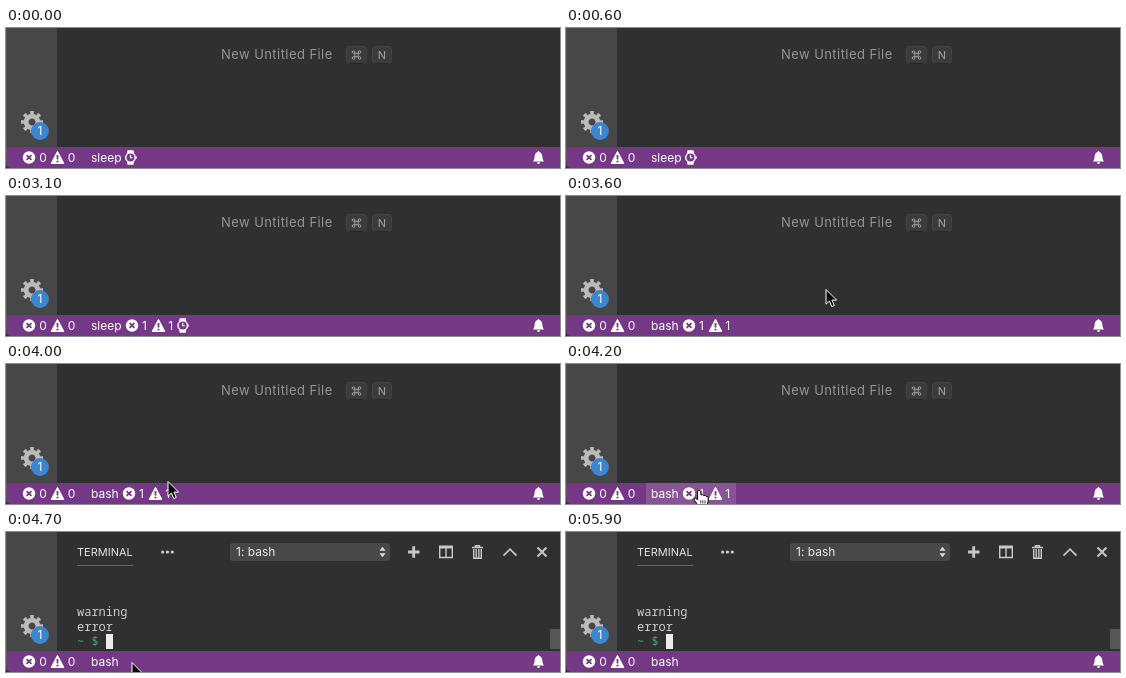
Animation of 554 by 140 pixels, one loop 6.3 s. Source, as an HTML page:

```html
<!DOCTYPE html>
<html lang="en">
<head>
<meta charset="utf-8">
<title>Terminal status</title>
<style>
  html, body { margin: 0; width: 100%; height: 100%; overflow: hidden; background: #303030; }
  svg { display: block; }
  text { font: 12px Inter, "Open Sans", sans-serif; white-space: pre; }
  .mono text { font: 12px "Noto Sans Mono", "DejaVu Sans Mono", monospace; fill: #ccc; }
  .status { fill: #fff; }
  .line { fill: none; stroke: #c8c8c8; }
  [data-show], #arrow, #hand { display: none; }
</style>
</head>
<body>
<svg width="554" height="140" viewBox="0 0 554 140">
  <defs>
    <g id="err">
      <circle r="6.2" fill="#fff"/>
      <path d="M-2.4-2.4 2.4 2.4M2.4-2.4-2.4 2.4" stroke="#743886" stroke-width="1.8"/>
    </g>
    <g id="warn">
      <path d="M0-5.8 6 5.7H-6Z" fill="#fff" stroke="#fff" stroke-width="1.4" stroke-linejoin="round"/>
      <path d="M0-2.6V2M0 3.3V5" stroke="#743886" stroke-width="1.8"/>
    </g>
    <g id="watch">
      <path d="M-3-7.3H3L3.6-4H-3.6ZM-3 7.3H3L3.6 4H-3.6ZM4.8-1H6.3V1H4.8Z" fill="#fff"/>
      <circle r="4.7" fill="#743886" stroke="#fff" stroke-width="1.4"/>
      <path d="M0-2.7V.3H2.2" fill="none" stroke="#fff" stroke-width="1.1"/>
    </g>
  </defs>

  <!-- window -->
  <rect width="554" height="140" fill="#303030"/>
  <rect width="51" height="119" fill="#474747"/>

  <!-- gear and badge -->
  <g transform="translate(26 94)" fill="none" stroke="#bcbcb9">
    <circle r="5.9" stroke-width="4.8"/>
    <circle r="9.3" stroke-width="3.4" pathLength="16" stroke-dasharray="1" stroke-dashoffset=".5"/>
  </g>
  <circle cx="34" cy="103" r="9" fill="#3b86d1"/>
  <text x="34" y="107.3" fill="#fff" text-anchor="middle">1</text>

  <!-- empty editor -->
  <g data-show="0 4700">
    <text x="215" y="31" fill="#959595" style="font-size:13px;letter-spacing:.43px">New Untitled File</text>
    <g fill="#3b3b3b" stroke="#444">
      <rect x="340.5" y="18.5" width="20" height="17" rx="3"/>
      <rect x="366.5" y="18.5" width="19" height="17" rx="3"/>
    </g>
    <path d="M343 35.5H358M369 35.5H383" stroke="#292929"/>
    <path transform="translate(350.5 27)" fill="none" stroke="#a2a2a2"
      d="M-1.7-1.7H1.7V1.7H-1.7ZM-1.7-1.7H-3A1.3 1.3 0 1 1-1.7-3ZM1.7-1.7V-3A1.3 1.3 0 1 1 3-1.7ZM1.7 1.7H3A1.3 1.3 0 1 1 1.7 3ZM-1.7 1.7V3A1.3 1.3 0 1 1-3 1.7Z"/>
    <text x="376" y="31" fill="#a2a2a2" text-anchor="middle" style="font-size:11px">N</text>
  </g>

  <!-- terminal panel -->
  <g data-show="4700 6300">
    <text x="71" y="24" fill="#e4e4e4" style="font-size:11px">TERMINAL</text>
    <path d="M71 33.5H127" stroke="#696969"/>
    <g fill="#d0d0d0">
      <circle cx="156.7" cy="20" r="1.6"/><circle cx="161.5" cy="20" r="1.6"/><circle cx="166.3" cy="20" r="1.6"/>
    </g>
    <rect x="224" y="11" width="160" height="18" rx="3" fill="#484848"/>
    <text x="230" y="24.3" fill="#ececec">1: bash</text>
    <path d="M373.5 18.7 376.5 14.7 379.5 18.7ZM373.5 21.3 376.5 25.3 379.5 21.3Z" fill="#ddd"/>
    <g class="line">
      <path d="M402 20H413.5M407.7 14.2V25.8" stroke-width="2.8"/>
      <path d="M433.7 15V25.5H446.3V15M440 15V25.5" stroke-width="1.4"/>
      <path d="M433 15H447" stroke-width="3"/>
      <path d="M466 15.5H477M469.5 15V13.7H473.5V15" stroke-width="1.4"/>
      <path d="M467.7 17V26.2H475.3V17M470.2 17V26M472.8 17V26" stroke-width="1.4"/>
      <path d="M497.5 23.7 504 17.2 510.5 23.7" stroke-width="1.7"/>
      <path d="M531.5 15.5 540.5 24.5M540.5 15.5 531.5 24.5" stroke-width="2"/>
    </g>
    <g class="mono">
      <text x="71" y="84">warning</text>
      <text x="71" y="99">error</text>
      <text x="71" y="114" style="fill:#3f9fae">~</text>
      <text x="85.4" y="114" style="fill:#35a77c">$</text>
    </g>
    <rect x="100" y="102" width="7" height="15" fill="#ececec"/>
    <rect x="544" y="97" width="10" height="20" fill="#565656"/>
  </g>

  <!-- status bar -->
  <rect y="119" width="554" height="21" fill="#743886"/>
  <rect data-show="4200 4700" x="80" y="119" width="90" height="21" fill="#fff" fill-opacity=".14"/>
  <g class="status">
    <use href="#err" x="23" y="129.5"/><text x="33.2" y="134">0</text>
    <use href="#warn" x="51.5" y="129.5"/><text x="61.8" y="134">0</text>
    <path d="M526.8 133.5C528.6 132 528.4 130.5 528.6 128.3 528.8 125.8 530.2 124.4 531.5 124A1 1 0 0 1 533.5 124C534.8 124.4 536.2 125.8 536.4 128.3 536.6 130.5 536.4 132 538.2 133.5ZM530.8 134.3H534.2A1.7 1.7 0 0 1 530.8 134.3Z"/>
    <text data-show="0 3500" x="85" y="134">sleep</text>
    <text data-show="3500 6300" x="85" y="134">bash</text>
    <use data-show="0 2400" href="#watch" x="124.5" y="129.5"/>
    <g data-show="2400 3100">
      <use href="#warn" x="126" y="129.5"/><text x="136" y="134">1</text>
    </g>
    <g data-show="3100 3500" transform="translate(3 0)">
      <use href="#err" x="123" y="129.5"/><text x="133" y="134">1</text>
      <use href="#warn" x="149.5" y="129.5"/><text x="159.3" y="134">1</text>
      <use href="#watch" x="173.7" y="129.5"/>
    </g>
    <g data-show="3500 4700">
      <use href="#err" x="123" y="129.5"/><text x="133" y="134">1</text>
      <use href="#warn" x="149.5" y="129.5"/><text x="159.3" y="134">1</text>
    </g>
  </g>

  <!-- window edge -->
  <path d="M.5 0V135" stroke="#5c5c5c" stroke-opacity=".7"/>
  <path d="M0 135Q0 140 5 140H0Z" fill="#2a2a2a"/>

  <!-- pointers, tip at the origin -->
  <path id="arrow" d="M0 .5V15.2L3.4 12 5.8 17.6 8.3 16.5 5.9 11.1H10.6Z" fill="#080808" stroke="#fff" stroke-linejoin="round"/>
  <g id="hand">
    <path d="M-1.6 1.2Q0-1 1.6 1.2L2 5Q3.8 4 4.7 5.6 6.4 4.7 7.1 6.4 9 5.8 9.2 8V11Q8.7 13.5 7.6 16H-.8Q-2.5 12.8-4.6 10.3-5.3 8.3-3.4 8.2L-1.3 9.7Z" fill="#fff" stroke="#080808" stroke-linejoin="round"/>
    <path d="M1.7 10.3V13.5M3.8 10.3V13.5M6 10.3V13.5" stroke="#080808" stroke-width=".8"/>
  </g>
</svg>
<script>
  const LOOP = 6300, STEP = 100;
  const PATH = [ // time, x, y
    [3600, 260, 93], [3800, 214, 104], [4000, 162, 117], [4200, 133, 126],
    [4600, 126, 130], [5700, 126, 130], [5800, 132, 135], [5900, 132, 135]
  ];
  const parts = [...document.querySelectorAll("[data-show]")].map(el => {
    const [from, to] = el.dataset.show.split(" ").map(Number);
    return { el, from, to };
  });
  const arrow = document.getElementById("arrow");
  const hand = document.getElementById("hand");

  const show = (el, on) => { el.style.display = on ? "inline" : "none"; };

  function pointAt(t) {
    const i = PATH.findIndex(p => p[0] > t);
    if (i < 1) return null;
    const [t0, x0, y0] = PATH[i - 1], [t1, x1, y1] = PATH[i];
    const k = (t - t0) / (t1 - t0);
    return [x0 + (x1 - x0) * k, y0 + (y1 - y0) * k];
  }

  function draw(now) {
    const t = Math.floor((now % LOOP) / STEP) * STEP;
    for (const { el, from, to } of parts) show(el, t >= from && t < to);
    const point = pointAt(t);
    const linked = t >= 4200 && t < 4700;
    show(arrow, point && !linked);
    show(hand, point && linked);
    if (point) (linked ? hand : arrow).setAttribute("transform", `translate(${point})`);
  }

  const start = performance.now();
  function tick() {
    draw(performance.now() - start);
    requestAnimationFrame(tick);
  }
  tick();
</script>
</body>
</html>
```
